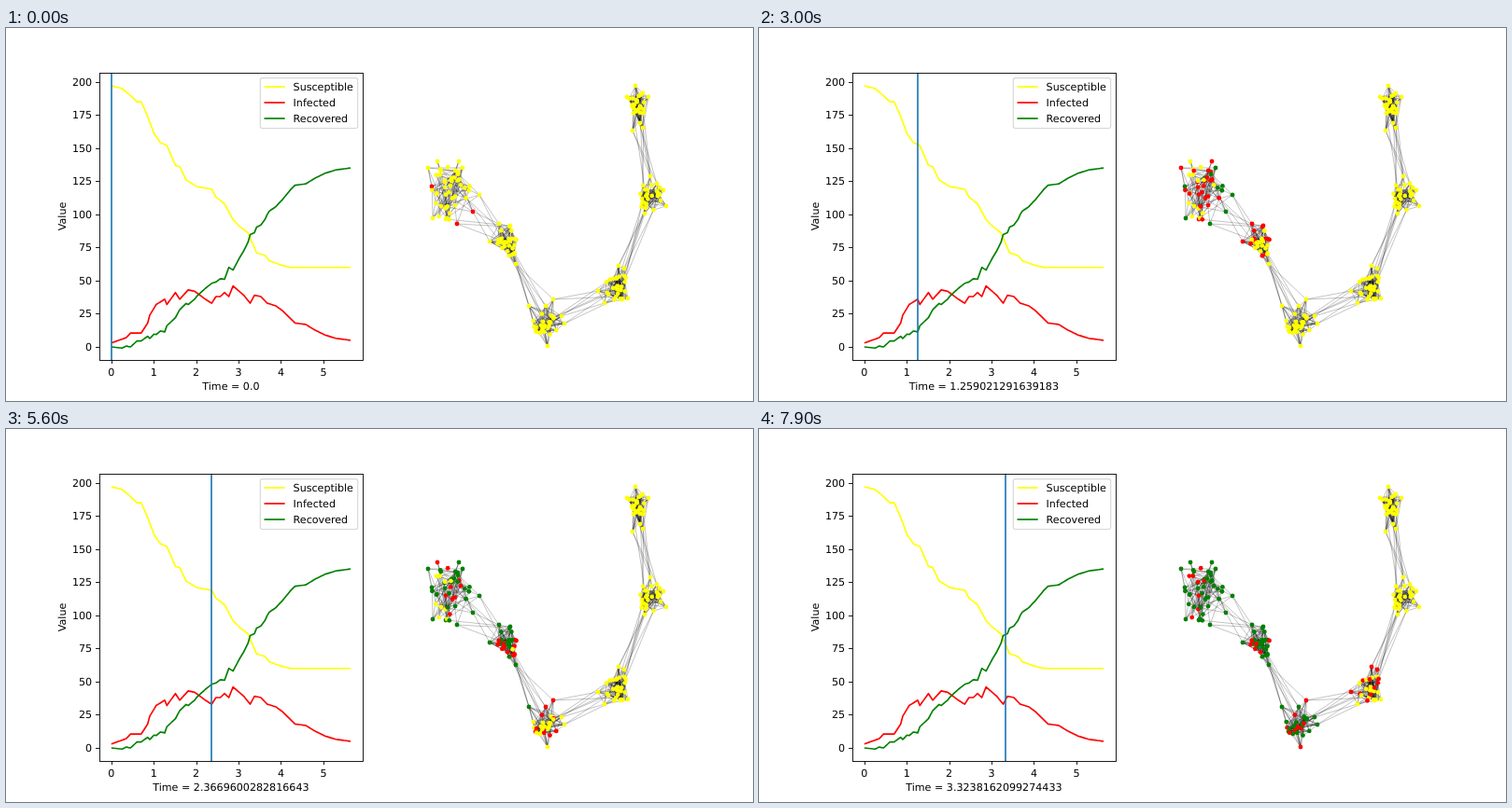
Animation of 800x400 px, one loop 8 s. Source, as an HTML page:

```html
<!DOCTYPE html>
<html lang="en">
<head>
<meta charset="utf-8">
<title>Epidemic on a chain of communities</title>
<style>
  html, body { margin: 0; width: 100%; height: 100%; overflow: hidden; background: #fff; }
  svg { display: block; width: 800px; height: 400px; }
  text { font: 11.11px "DejaVu Sans", sans-serif; fill: #000; text-rendering: geometricPrecision; }
</style>
</head>
<body>
<svg id="stage" viewBox="0 0 800 400"></svg>
<script>
const LOOP = 8000, FRAME = 100, STEP_MS = 120;
const STEP = 0.050360851665567323, LAST_STEP = 112, POPULATION = 200;
const COLORS = { susceptible: '#ffff00', infected: '#ff0000', recovered: '#008000' };
const stage = document.getElementById('stage');

function add(tag, attrs, parent = stage) {
  const el = document.createElementNS('http://www.w3.org/2000/svg', tag);
  for (const key in attrs) el.setAttribute(key, attrs[key]);
  parent.appendChild(el);
  return el;
}
function label(x, y, content, anchor = 'start', extra = {}) {
  const el = add('text', { x, y, 'text-anchor': anchor, ...extra });
  el.textContent = content;
  return el;
}
function seeded(seed) {
  return () => (seed = (seed * 16807) % 2147483647) / 2147483647;
}
const pairs = list => list.trim().split(/\s+/).map(pair => pair.split(',').map(Number));

// Counts over the steps of the epidemic, linear between key points
function track(list) {
  const keys = pairs(list);
  return step => {
    const next = Math.max(1, keys.findIndex(([at]) => at >= step));
    const [[s0, v0], [s1, v1]] = [keys[next - 1], keys[next]];
    return v0 + (v1 - v0) * (step - s0) / (s1 - s0);
  };
}
const susceptible = track(`0,197 5,195 8,191 12,185 14,185 17,174 20,161 23,154 26,152 30,137 32,136 35,126
  40,121 47,119 49,113 53,108 57,96 60,91 64,86 68,71 72,69 74,65 79,62 84,60 112,60`);
const infected = track(`0,3 7,7 9,10.5 14,10.5 17,18 18,24 21,32 25,36 26,32 30,41 32,36 36,43 39,42 44,36
  47,33 49,38 51,38 53,41 55,38 57,46 62,39 65,33 67,39 70,38 73,33 77,31 80,27.5 86,18 91,17 95,13
  100,9 105,6.5 112,5`);
const recovered = step => POPULATION - susceptible(step) - infected(step);
const CURVES = { susceptible, infected, recovered };

// Chart
const toX = t => 112.81 + 45.422 * t;
const toY = v => 342 - 1.4213 * v;
const STROKE = { fill: 'none', 'stroke-width': 1.67, 'stroke-linejoin': 'round' };

for (const name in CURVES) {
  const points = Array.from({ length: LAST_STEP + 1 }, (_, s) => [toX(s * STEP), toY(CURVES[name](s))]);
  add('polyline', { ...STROKE, points: points.join(' '), stroke: COLORS[name] });
}
const cursor = add('path', { ...STROKE, stroke: '#1f77b4' });

const axis = { fill: 'none', stroke: '#000', 'stroke-width': 0.89 };
for (let n = 0; n <= 5; n++) {
  add('path', { ...axis, d: `M${Math.round(toX(n)) + 0.5} 356v4` });
  label(toX(n), 373, n, 'middle');
}
for (let v = 0; v <= 200; v += 25) {
  const y = Math.round(toY(v));
  add('path', { ...axis, d: `M100 ${y + 0.5}h-4` });
  label(92.2, y + 4, v, 'end');
}
add('rect', { ...axis, x: 100.5, y: 48.5, width: 282, height: 308 });
label(0, 0, 'Value', 'middle', { transform: 'translate(64 202) rotate(-90)' });
const timeLabel = label(240.9, 388, '', 'middle');

add('rect', { x: 272.3, y: 53.6, width: 104.4, height: 53.9, rx: 2.2, fill: '#fff', 'fill-opacity': 0.8,
  stroke: '#ccc', 'stroke-opacity': 0.8, 'stroke-width': 1.11 });
Object.keys(CURVES).forEach((name, row) => {
  const y = 63 + 17 * row;
  add('path', { ...STROKE, d: `M276.5 ${y}h22.2`, stroke: COLORS[name] });
  label(307.6, y + 4, name[0].toUpperCase() + name.slice(1));
});

// Network: a chain of communities, each a random core with a few outlying members.
// The infection reaches a community at step `onset` and takes `span` steps to run through it.
const random = seeded(4711);
const COMMUNITIES = [
  { x: 475, y: 177, rx: 23, ry: 29, size: 50, density: 0.11, onset: 0, span: 55,
    rim: '456,170 500,197 483,210 452,150 462,143 485,143 489,150 507,179 457,204 471,205' },
  { x: 537, y: 230, rx: 11, ry: 18, onset: 13, span: 30, rim: '518,229 528,210 540,212 546,253' },
  { x: 578, y: 319, rx: 14, ry: 16, onset: 40, span: 20,
    rim: '560,298 586,291 578,298 595,309 598,317 580,341' },
  { x: 654, y: 278, rx: 12, ry: 18, onset: 57, span: 25, rim: '656,255 662,258 634,282 641,295 666,290' },
  { x: 690, y: 181, rx: 12, ry: 18, onset: 200, span: 50, rim: '690,159 700,171 707,191 704,174 684,199' },
  { x: 675, y: 82, rx: 11, ry: 16, onset: 200, span: 50, rim: '674,62 665,74 688,74 671,110 679,102 682,107' }
];
const FIRST_CASES = 3;

const clusters = COMMUNITIES.map(({ x, y, rx, ry, size = 30, onset, span, rim }) => {
  const places = pairs(rim);
  while (places.length < size) {
    const angle = 2 * Math.PI * random(), r = random() ** 0.6;
    places.push([x + rx * r * Math.cos(angle), y + ry * r * Math.sin(angle)]);
  }
  return places.map(([x, y], i) => {
    const caught = i < FIRST_CASES ? onset : onset + span * random() ** 1.5;
    return { x, y, caught, healed: caught + 3 - 17 * Math.log(random()) };
  });
});
const nodes = clusters.flat();

function rank(key, name) {
  [...nodes].sort((a, b) => a[key] - b[key]).forEach((node, i) => { node[name] = i; });
}
rank('caught', 'catchRank');
rank('healed', 'healRank');

const edges = add('g', { stroke: '#000', 'stroke-width': 0.4, 'stroke-opacity': 0.6 });
const link = (a, b) => add('path', { d: `M${a.x} ${a.y}L${b.x} ${b.y}` }, edges);

clusters.forEach((members, c) => {
  const { density = 0.36 } = COMMUNITIES[c];
  members.forEach((a, i) => members.slice(i + 1).forEach(b => {
    if (random() < density) link(a, b);
  }));
});

// Bridges join the members that lie closest to the neighbouring community.
function facing(c, other) {
  const { x, y } = COMMUNITIES[other];
  const distance = n => Math.hypot(n.x - x, n.y - y);
  return [...clusters[c]].sort((a, b) => distance(a) - distance(b));
}
for (let c = 0; c < clusters.length - 1; c++) {
  const near = facing(c, c + 1), far = facing(c + 1, c);
  for (let k = 0; k < 9; k++) link(near[k % 5], far[(k * 3) % 7]);
}

for (const node of nodes) node.dot = add('circle', { cx: node.x, cy: node.y, r: 2.4 });

function stateOf(node, step) {
  if (node.catchRank >= POPULATION - susceptible(step)) return 'susceptible';
  return node.healRank < Math.round(recovered(step)) ? 'recovered' : 'infected';
}

let shown = -1;
function render(ms) {
  const tick = Math.floor((ms % LOOP) / FRAME) * FRAME;
  const step = Math.floor((tick + 50) / STEP_MS);
  if (step === shown) return;
  shown = step;
  const time = step * STEP;
  cursor.setAttribute('d', `M${Math.round(toX(time))} 48V356`);
  timeLabel.textContent = 'Time = ' + (step ? time : '0.0');
  for (const node of nodes) node.dot.setAttribute('fill', COLORS[stateOf(node, step)]);
}

const start = performance.now();
function loop() {
  render(performance.now() - start);
  requestAnimationFrame(loop);
}
loop();
</script>
</body>
</html>
```
